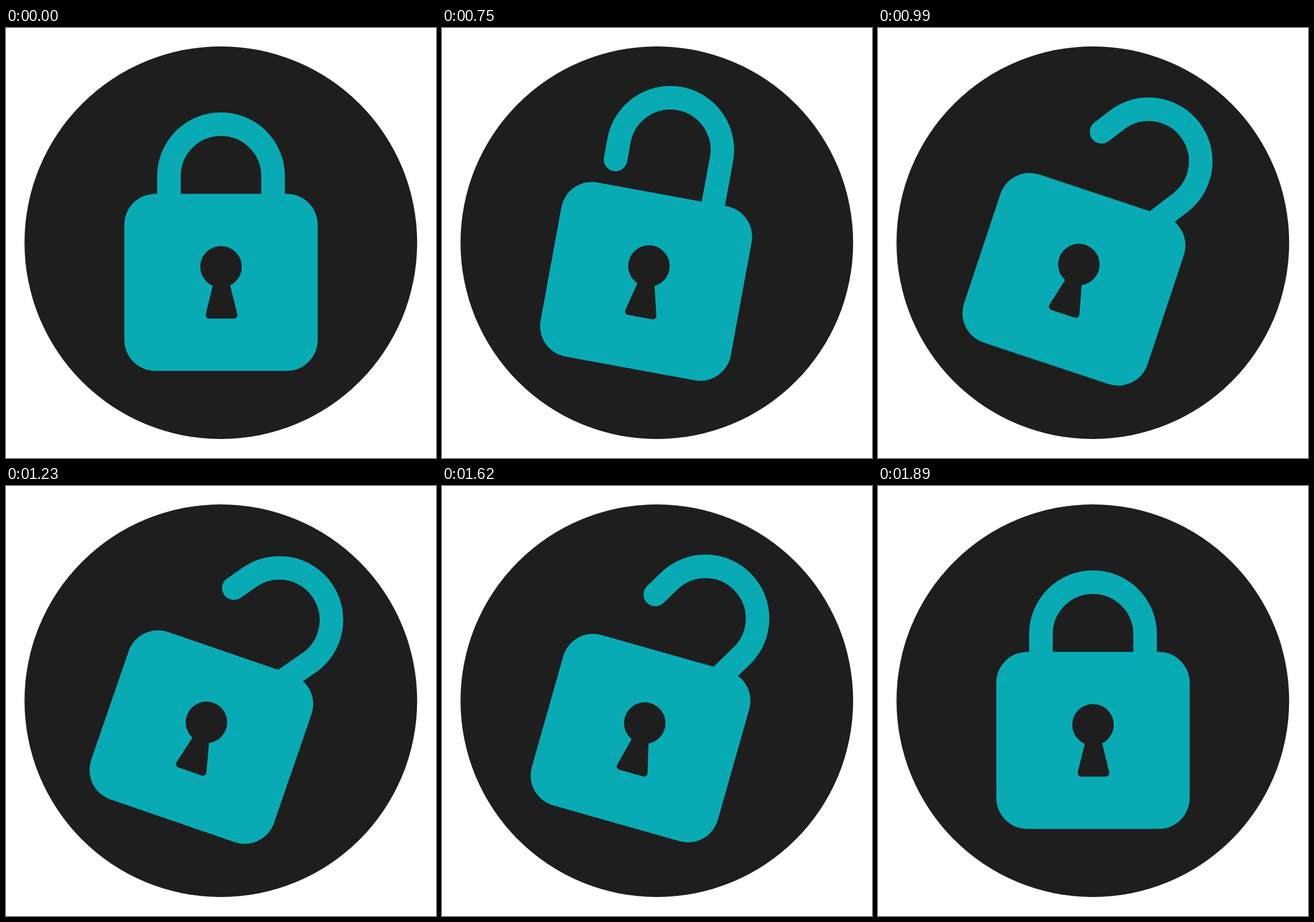
Recreate the animation shown at these times as an HTML page. Size 748 px wide and 748 px high, loop 1980 ms.

```html
<!DOCTYPE html>
<html lang="en">
<head>
<meta charset="utf-8">
<title>Padlock</title>
<style>
  html, body { margin: 0; width: 100%; height: 100%; overflow: hidden; background: #fff; }
  svg { display: block; width: 100%; height: 100%; }
</style>
</head>
<body>
<svg viewBox="0 0 748 748">
  <circle cx="373.7" cy="373.5" r="341.5" fill="#1e1e1e"/>
  <g id="lock">
    <path id="shackle" d="M283.4 291.5V257.7a90.6 90.6 0 0 1 181.2 0V390"
      fill="none" stroke="#08abb4" stroke-width="41" stroke-linecap="round"/>
    <rect x="205.8" y="288.5" width="336.4" height="308" rx="54" fill="#08abb4"/>
    <g fill="#1e1e1e">
      <circle cx="374" cy="415.4" r="36.1"/>
      <path d="M370.4 430L353.3 499.5H396.5L379.4 430Z"
        stroke="#1e1e1e" stroke-width="12" stroke-linejoin="round"/>
    </g>
  </g>
</svg>
<script>
  const STEP = 30, LOOP = 1980;
  const lock = document.getElementById('lock');
  const shackle = document.getElementById('shackle');

  const ramp = (t, from, to) => Math.min(1, Math.max(0, (t - from) / (to - from)));
  const smooth = u => u * u * (3 - 2 * u);
  const soft = u => (u + smooth(u)) / 2;

  // Opens quickly to a share of the peak, creeps up to the peak, then falls back to zero.
  function swell(t, { peak, share, start, open, close, end }) {
    const rise = smooth(ramp(t, start, open));
    const creep = smooth(ramp(t, open, close));
    const fall = soft(ramp(t, close, end));
    return peak * (share * rise + (1 - share) * creep) * (1 - fall);
  }

  const tilt = { peak: 19.6, share: 0.935, start: 570, open: 900, close: 1535, end: 1890 };
  const lift = { peak: 66.7, share: 0.9, start: 540, open: 835, close: 1560, end: 1800 };
  const swing = { peak: 39.2, share: 0.872, start: 750, open: 960, close: 1535, end: 1842 };

  function draw(now) {
    const t = Math.floor(now % LOOP / STEP) * STEP;
    lock.setAttribute('transform', `rotate(${swell(t, tilt)} 374 337.5)`);
    shackle.setAttribute('transform',
      `translate(0 ${-swell(t, lift)}) rotate(${swell(t, swing)} 387.2 357.7)`);
    requestAnimationFrame(draw);
  }
  draw(0);
</script>
</body>
</html>
```
